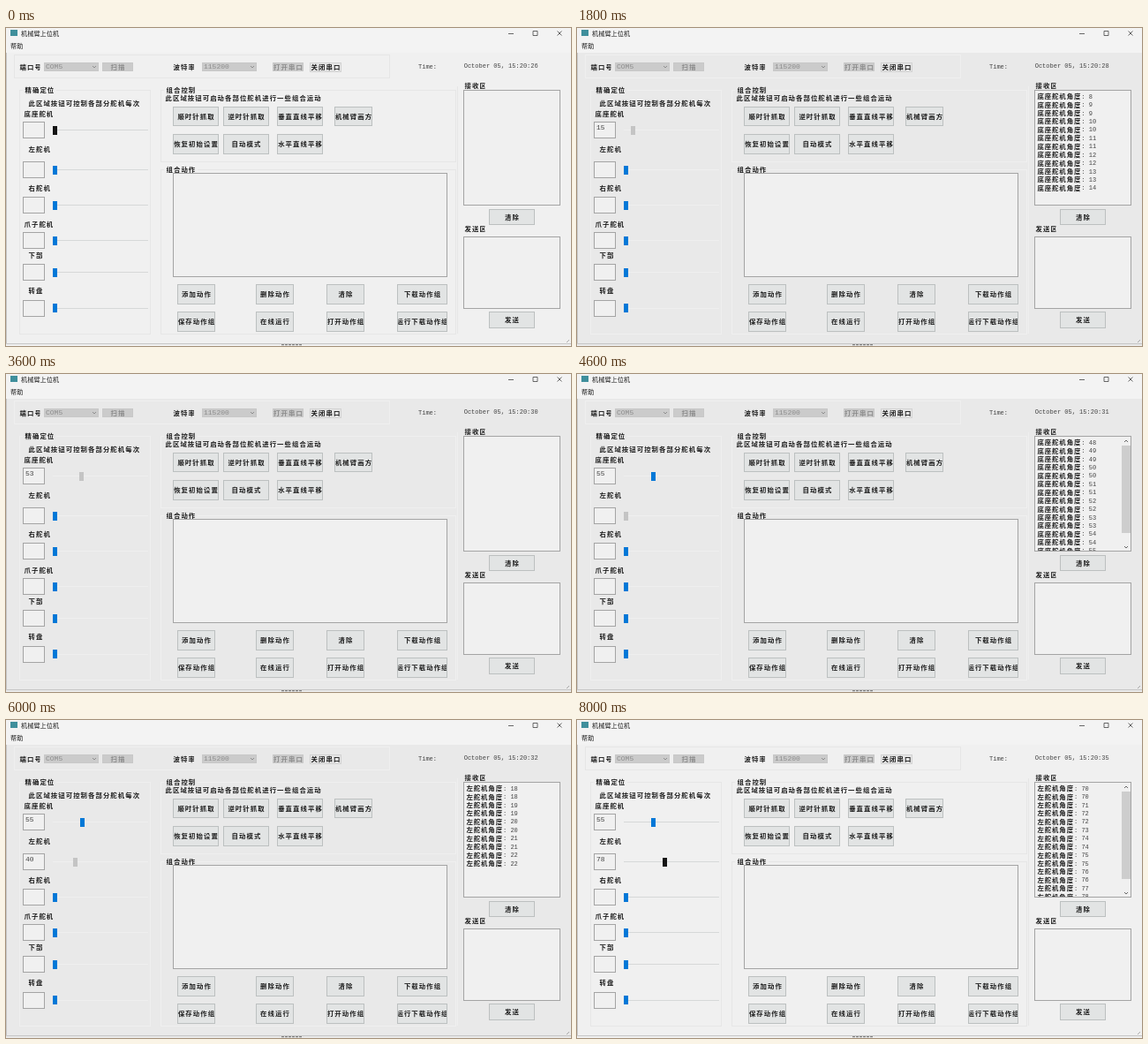
An HTML page for the animation above (8.2 s loop, 640 by 360 pixels).

```html
<!DOCTYPE html>
<html lang="zh-CN">
<head>
<meta charset="utf-8">
<title>机械臂上位机</title>
<style>
html, body { margin: 0; width: 100%; height: 100%; overflow: hidden; background: #f0f0f0; }
svg { display: block; }
text { font: 600 7.4px "Noto Sans CJK SC", "Noto Sans CJK", sans-serif; letter-spacing: 1.05px; fill: #1c1c1c; white-space: pre; }
.ui { font-size: 7.2px; font-weight: 400; letter-spacing: 0; }
.mono { font: 7px "Liberation Mono", monospace; letter-spacing: 0; fill: #444; }
.large { font-size: 8px; }
.off { fill: #8c8c8c; }
.row { letter-spacing: .9px; }
.page { fill: #f0f0f0; }
.frame { fill: none; stroke: #e6e6e6; }
.track { fill: none; stroke: #d6d8d8; }
.dim .page { fill: #e9e9e9; }
.dim .frame, .dim .track { stroke: #efefef; }
.button { fill: #e2e4e4; stroke: #bcc0c0; }
.flat { fill: #e6e6e6; stroke: #d2d2d2; }
.disabled { fill: #cbcbcb; stroke: #c8c8c8; }
.field { fill: #f0f0f0; stroke: #a4a4a4; }
.icon { fill: none; stroke: #444; stroke-width: .8; }
</style>
</head>
<body>
<svg id="stage" width="640" height="360" viewBox="0 0 640 360"></svg>
<script>
const NS = "http://www.w3.org/2000/svg";
const LOOP = 8200, STEP = 200;
const stage = document.getElementById("stage");

function add(tag, attrs, parent = stage) {
  const el = document.createElementNS(NS, tag);
  for (const key in attrs) el.setAttribute(key, attrs[key]);
  return parent.appendChild(el);
}

function rect(x, y, right, bottom, cls, parent) {
  return add("rect", { x, y, width: right - x, height: bottom - y, class: cls }, parent);
}

function label(x, middle, content, cls = "", parent = stage) {
  const offset = cls.includes("mono") ? 2.3 : 2.7;
  const el = add("text", { x, y: middle + offset, class: cls }, parent);
  el.textContent = content;
  return el;
}

function clip(x, y, width, height) {
  return add("svg", { x, y, width, height, overflow: "hidden" });
}

function cutLabel(x, middle, width, content) {
  label(.5, 7, content, "", clip(x, middle - 7, width, 14));
}

function button(x, y, right, bottom, content, cls = "button", textCls = "") {
  rect(x + .5, y + .5, right - .5, bottom - .5, cls);
  const inner = clip(x + 1, y + 1, right - x - 2, bottom - y - 2);
  label((right - x - 1) / 2, (bottom - y - 2) / 2, content, textCls, inner)
    .setAttribute("text-anchor", "middle");
}

function combo(x, right, content) {
  rect(x + .5, 39.5, right - .5, 48.5, "disabled");
  label(x + 2, 44, content, "mono large off");
  add("path", { d: `M${right - 7} 43l2 2 2-2`, class: "icon", opacity: .55 });
}

// Window chrome
rect(0, 0, 640, 360, "page");
add("rect", { width: 640, height: 28, fill: "#f3f3f3" });
add("rect", { x: 5, y: 2, width: 8, height: 7, fill: "#3f8f9c" });
label(17, 6, "机械臂上位机", "ui");
label(5, 20.5, "帮助", "ui");
add("path", { d: "M569 6.5h6M597 3.5h5v5h-5zM624.5 3.5l5 5m0-5l-5 5", class: "icon" });
add("path", { d: "M.5 28V357.5H640", fill: "none", stroke: "#c5c5c5" });
add("path", { d: "M312 358.7h23", class: "icon", "stroke-dasharray": "3 1" });
add("path", { d: "M635 356l3-3", class: "icon", opacity: .5 });

// Group frames
for (const [x, y, right, bottom] of [
  [9.5, 30.5, 434.5, 56.5], [15.5, 70.5, 163.5, 346.5],
  [175.5, 70.5, 509.5, 151.5], [175.5, 160.5, 509.5, 346.5]
]) rect(x, y, right, bottom, "frame");
add("path", { d: "M511.5 66V346", class: "frame" });
for (const [x, y] of [[19, 64], [179, 64], [179, 154]]) rect(x, y, x + 38, y + 12, "page");

// Connection bar
cutLabel(15, 44, 23.5, "端口号");
combo(43, 105, "COM5");
button(109, 39, 144, 49, "扫描", "disabled", "off");
cutLabel(189, 44, 24, "波特率");
combo(222, 284, "115200");
button(302, 39, 337, 49, "打开串口", "disabled", "off");
button(344, 39, 380, 50, "关闭串口", "flat");
label(467, 43.2, "Time:", "mono");
const clock = label(518.7, 42.2, "", "mono");

// Headings
label(21.5, 70, "精确定位");
label(25.5, 85, "此区域按钮可控制各部分舵机每次");
label(181.5, 70, "组合控制");
label(180.5, 79, "此区域按钮可启动各部位舵机进行一些组合运动");
label(181.5, 160, "组合动作");
cutLabel(519, 65, 23.5, "接收区");
cutLabel(519, 227, 23.5, "发送区");

// Servo rows
const servos = [
  ["底座舵机", 20, 97, 115.5], ["左舵机", 25, 137, 160.5], ["右舵机", 25, 181, 200.5],
  ["爪子舵机", 20, 222, 240.5], ["下部", 25, 257, 276.5], ["转盘", 25, 297, 317]
].map(([name, x, nameY, y]) => {
  label(x + .5, nameY, name);
  rect(19.5, Math.floor(y) - 8.5, 43.5, Math.floor(y) + 9.5, "field");
  add("path", { d: `M53 ${Math.floor(y) + .5}H161`, class: "track" });
  return {
    value: label(22, y - 2.5, "", "mono large"),
    handle: add("rect", { y: Math.round(y - 5), width: 5, height: 10 })
  };
});

// Action buttons
const actions = [
  [89, 111, [[189, 241, "顺时针抓取"], [246, 298, "逆时针抓取"], [307, 359, "垂直直线平移"], [372, 415, "机械臂画方"]]],
  [120, 143, [[189, 241, "恢复初始设置"], [246, 298, "自动模式"], [307, 359, "水平直线平移"]]],
  [290, 313, [[194, 237, "添加动作"], [283, 326, "删除动作"], [363, 406, "清除"], [443, 500, "下载动作组"]]],
  [321, 344, [[194, 237, "保存动作组"], [283, 326, "在线运行"], [363, 406, "打开动作组"], [443, 500, "运行下载动作组"]]],
  [205, 223, [[547, 599, "清除"]]],
  [321, 340, [[547, 599, "发送"]]]
];
for (const [y, bottom, row] of actions)
  for (const [x, right, name] of row) button(x, y, right, bottom, name);

// Text areas and receive log
rect(189.5, 164.5, 499.5, 281.5, "field");
rect(518.5, 70.5, 627.5, 200.5, "field");
rect(518.5, 236.5, 627.5, 317.5, "field");
const log = clip(519, 71, 108, 129);
const rows = Array.from({ length: 16 }, (_, i) => {
  const y = 6.5 + i * 9.42;
  return { name: label(2.5, y, "", "row", log), angle: label(0, y, "", "mono", log) };
});
const scrollbar = add("g", {}, log);
add("rect", { x: 98, width: 10, height: 130, fill: "#f0f0f0" }, scrollbar);
add("rect", { x: 98, y: 10, width: 10, height: 99, fill: "#cdcdcd" }, scrollbar);
add("path", { d: "M101 6l2-2 2 2M101 124l2 2 2-2", class: "icon" }, scrollbar);

const clamp = (v, low, high) => Math.max(low, Math.min(high, v));

// Each servo: drag start, degrees per ms, final angle, then handle colours by time
const drags = [
  { start: 1085, rate: .021, end: 55, colors: [[0, "#151515"], [800, "#c4c4c4"], [3800, "#151515"], [4200, "#0078d7"]] },
  { start: 5000, rate: .04, end: 78, colors: [[0, "#0078d7"], [4400, "#c4c4c4"], [7000, "#151515"]] }
];
const leftPages = [0, 9, 18, 26, 34, 41, 48, 56, 63, 70];
const lastPage = [..."00122344556678"].map(Number);

function logState(t) {
  if (t < 5200) {
    const angle = clamp(14.2 + (t - 1800) * .019, 0, 55.2);
    const base = Math.floor(angle / 8) * 8;
    return { name: "底座舵机角度", angle, base, offset: i => (i + 1) / 2 };
  }
  const angle = 22.6 + (t - 6000) * .02833;
  const base = leftPages.filter(p => p <= Math.max(0, angle)).pop();
  return { name: "左舵机角度", angle, base, offset: i => base === 70 ? lastPage[i] ?? 99 : i / 2 };
}

function draw(t) {
  stage.classList.toggle("dim", t >= 800 && t < 7600);
  clock.textContent = "October 05, 15:20:" + Math.floor(26.64 + t * .00105);

  servos.forEach(({ value, handle }, i) => {
    const drag = drags[i];
    const angle = drag ? Math.round(clamp((t - drag.start) * drag.rate, 0, drag.end)) : 0;
    value.textContent = angle || "";
    handle.setAttribute("x", Math.round(53 + angle * .565));
    handle.setAttribute("fill", drag ? drag.colors.filter(c => c[0] <= t).pop()[1] : "#0078d7");
  });

  const { name, angle, base, offset } = logState(t);
  let count = 0;
  rows.forEach((row, i) => {
    const value = base + offset(i);
    const shown = value <= angle;
    if (shown) count++;
    row.name.textContent = shown ? name : "";
    row.angle.textContent = shown ? ": " + Math.floor(value) : "";
    row.angle.setAttribute("x", 2.5 + name.length * 8.3);
  });
  scrollbar.setAttribute("visibility", count > 13 ? "visible" : "hidden");
}

let last = -1;
const origin = performance.now();
function tick() {
  const t = Math.floor((performance.now() - origin) % LOOP / STEP) * STEP;
  if (t !== last) draw(last = t);
  requestAnimationFrame(tick);
}
tick();
</script>
</body>
</html>
```
